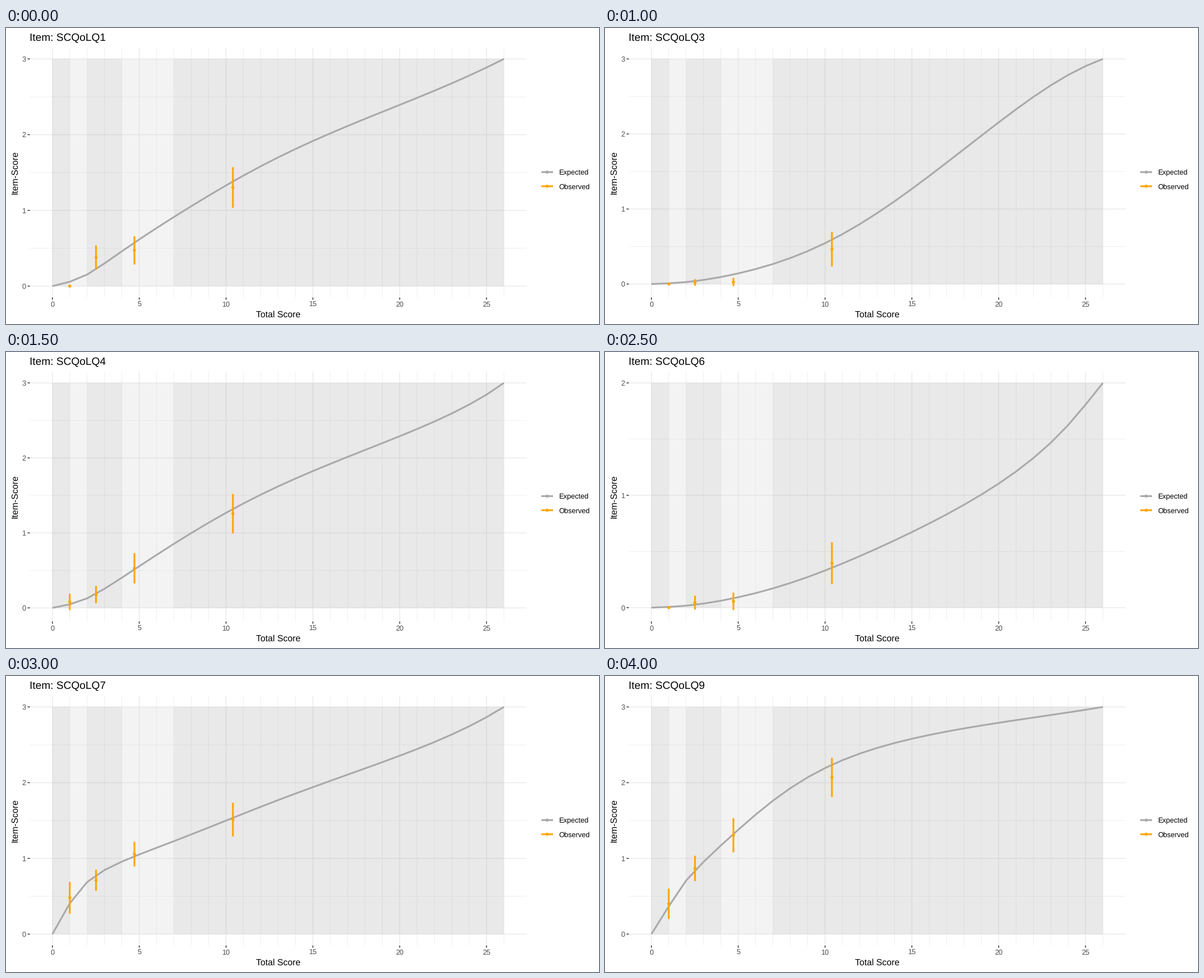
A matplotlib script that plays this animation: 1058 by 529 pixels, repeating every 4500 ms.

```python
import numpy as np
import matplotlib.pyplot as plt
from matplotlib.animation import FuncAnimation
from matplotlib.patches import Circle, Rectangle

W, H, DPI = 1058, 529, 100
PT = 72 / DPI  # points per pixel
LEFT, RIGHT, TOP, BOTTOM = 42.5, 928.6, 35.0, 481.6
PAD_X, PAD_Y = (RIGHT - LEFT) / 22, (BOTTOM - TOP) / 22
GRID, GREY, ORANGE = "#EBEBEB", "#A9A9A9", "#FFA500"
BASE, SMALL = 15.9, 12.72  # text sizes in pixels

plt.rcParams["font.family"] = "Liberation Sans"
plt.rcParams["text.hinting"] = "none"

ITEMS = 9
TOP_SCORES = np.where(np.arange(ITEMS) == 5, 2, 3)
TOTAL = TOP_SCORES.sum()
scores = np.arange(TOTAL + 1)

# Key points of the item curves; the remaining items share the rest.
KEY_SCORES = [1, 4, 12, 25]
KEY_ITEMS = [0, 1, 3, 5, 6, 8]
KEY_VALUES = np.array([
    [.058, .46, 1.583, 2.887],
    [.091, .667, 1.987, 2.922],
    [.051, .402, 1.51, 2.844],
    [.007, .063, .458, 1.807],
    [.41, .955, 1.682, 2.864],
    [.37, 1.17, 2.384, 2.964],
])

# Score groups: persons, summed total score and its variance
PERSONS = np.array([25, 45, 36, 43])
MEANS = np.array([25, 113, 170, 447]) / PERSONS
SPREAD = np.array([0, .25, .6, 10])
EDGES = [0, 1, 2, 4, 7, TOTAL]

# Summed item scores in each group
SUMS = np.array([
    [0, 17, 17, 56], [1, 13, 34, 72], [0, 1, 1, 20],
    [2, 8, 19, 54], [0, 0, 7, 42], [0, 2, 2, 17],
    [12, 32, 38, 65], [0, 1, 5, 32], [10, 39, 47, 89],
])


def rasch(log_weights):
    """Mean and variance of each item score, given the total score."""
    weights = [np.exp(np.r_[0, row[:top]])
               for row, top in zip(log_weights.reshape(ITEMS, 3), TOP_SCORES)]
    mean, square = np.zeros((2, ITEMS, TOTAL + 1))
    for i, own in enumerate(weights):
        rest = np.ones(1)
        for j, other in enumerate(weights):
            if j != i:
                rest = np.convolve(rest, other)
        everyone = np.convolve(rest, own)
        x = np.arange(len(own))
        mean[i] = np.convolve(rest, own * x) / everyone
        square[i] = np.convolve(rest, own * x * x) / everyone
    return mean, square - mean ** 2


def fit_weights(rounds=40, ridge=5e-4, step=1e-5):
    """Levenberg-Marquardt fit of the Rasch model to the key points."""
    start = np.tile([-.5, -2, -4.5], ITEMS)

    def error(w):
        mean = rasch(w)[0][np.ix_(KEY_ITEMS, KEY_SCORES)]
        return np.r_[(mean - KEY_VALUES).ravel(), ridge * (w - start)]

    w, err, damping = start, error(start), 1e-3
    for _ in range(rounds):
        jac = np.array([(error(w + d) - err) / step
                        for d in step * np.eye(len(w))]).T
        move = np.linalg.solve(jac.T @ jac + damping * np.eye(len(w)),
                               -jac.T @ err)
        trial = w + np.clip(move, -1, 1)
        new = error(trial)
        if new @ new < err @ err:
            w, err, damping = trial, new, damping / 4
        else:
            damping *= 4
    return w


EXPECTED, VARIANCE = rasch(fit_weights())


def observed(i):
    """Group means and half lengths of their 95 % intervals."""
    top, curve = TOP_SCORES[i], EXPECTED[i]
    at_mean = np.interp(MEANS, scores, curve)
    slope = np.interp(MEANS, scores, np.gradient(curve))
    var = np.interp(MEANS, scores, VARIANCE[i]) + slope ** 2 * SPREAD
    mean = SUMS[i] / PERSONS
    var = var * mean * (top - mean) / (at_mean * (top - at_mean))
    return mean, 1.96 * np.sqrt(var / (PERSONS - 1))


fig = plt.figure(figsize=(W / DPI, H / DPI), dpi=DPI, facecolor="white")
ax = fig.add_axes([0, 0, 1, 1])


def x_px(score):
    return LEFT + PAD_X + np.asarray(score) / TOTAL * 20 * PAD_X


def line(x, y, color, width, zorder=2):
    ax.plot(x, y, color=color, lw=width * PT, solid_capstyle="butt",
            solid_joinstyle="round", snap=False, zorder=zorder)


def dot(x, y, color):
    ax.add_patch(Circle((x, y), 2.8, facecolor=color, lw=0, zorder=5))


def label(x, y, text, size=BASE, color="black", ha="left", **kw):
    ax.text(x, y, text, fontsize=size * PT, color=color, ha=ha,
            va="baseline", **kw)


def draw_grid(y_px, top):
    for s in scores:
        line([x_px(s)] * 2, [TOP, BOTTOM], GRID, .77 if s % 5 else 1.54)
    for half in range(2 * top + 1):
        line([LEFT, RIGHT], [y_px(half / 2)] * 2, GRID,
             .77 if half % 2 else 1.54)


def draw_bands(y_px, top):
    for i, (a, b) in enumerate(zip(EDGES, EDGES[1:])):
        ax.add_patch(Rectangle(
            (x_px(a), y_px(top)), x_px(b) - x_px(a), y_px(0) - y_px(top),
            facecolor="lightgrey" if i % 2 else "darkgrey", alpha=.25,
            lw=0, snap=False, zorder=2.1))


def draw_axes(y_px, top):
    for s in range(0, TOTAL, 5):
        line([x_px(s)] * 2, [BOTTOM, BOTTOM + 4], "#333333", 1.54)
        label(x_px(s), 498, str(s), SMALL, "#4D4D4D", "center")
    for s in range(top + 1):
        line([LEFT - 4, LEFT], [y_px(s)] * 2, "#333333", 1.54)
        label(35.4, y_px(s) + 4.6, str(s), SMALL, "#4D4D4D", "right")
    label((LEFT + RIGHT) / 2, 516.8, "Total Score", ha="center")
    label(20, (TOP + BOTTOM) / 2, "Item-Score", ha="center",
          rotation=90, rotation_mode="anchor")


def draw_legend():
    for y, text, color in ((257.6, "Expected", GREY), (282.8, "Observed", ORANGE)):
        line([955, 976], [y, y], color, 3.1)
        dot(965.5, y, color)
        label(986.5, y + 4.6, text, SMALL)


def draw(i):
    top = TOP_SCORES[i]
    mean, half = observed(i)
    low = min(0, (mean - half).min())

    def y_px(score):
        return TOP + PAD_Y + (top - score) / (top - low) * 20 * PAD_Y

    ax.clear()
    ax.set_xlim(0, W)
    ax.set_ylim(H, 0)
    ax.axis("off")
    draw_grid(y_px, top)
    draw_bands(y_px, top)
    line(x_px(scores), y_px(EXPECTED[i]), GREY, 3.1, zorder=3)
    for x, m, h in zip(x_px(MEANS), mean, half):
        line([x, x], [y_px(m - h), y_px(m + h)], ORANGE, 3.1, zorder=4)
        dot(x, y_px(m), ORANGE)
    draw_axes(y_px, top)
    draw_legend()
    label(LEFT, 22.4, f"Item: SCQoLQ{i + 1}", 1.2 * BASE)
    return []


anim = FuncAnimation(fig, draw, frames=ITEMS, interval=500,
                     init_func=lambda: [], repeat=True, repeat_delay=0)
plt.show()
```
